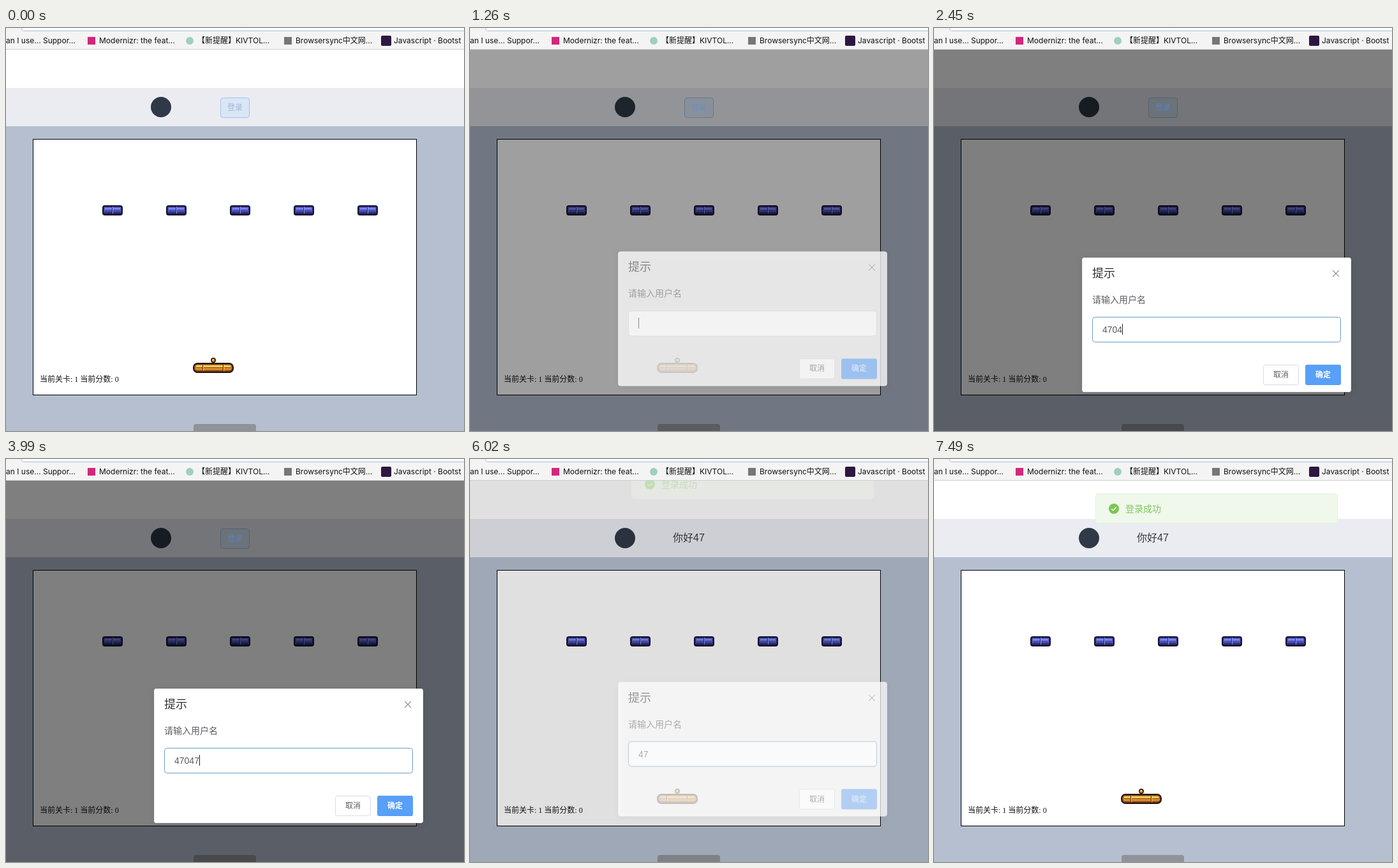
An HTML page with a canvas for the animation above (7560 ms loop, 718 by 632 pixels).

```html
<!DOCTYPE html>
<html lang="zh">
<head>
<meta charset="utf-8">
<title>Brick game login</title>
<style>
html, body { margin: 0; width: 100%; height: 100%; overflow: hidden; background: #fff; }
canvas { display: block; }
</style>
</head>
<body>
<canvas id="stage" width="718" height="632"></canvas>
<script>
const ctx = document.getElementById('stage').getContext('2d');
const W = 718, H = 632, LOOP = 7560;
const PAGE_TOP = 34, OPEN = 1170, CLOSE = 5930, GREET = 5958;
const UI = '"Liberation Sans", "Noto Sans CJK SC", "Noto Sans CJK", sans-serif';
const CHROME = 'Inter, "Noto Sans CJK SC", "Noto Sans CJK", sans-serif';
const SERIF = '"Liberation Serif", "Noto Sans CJK SC", "Noto Sans CJK", serif';

const USER = '47047047';
const TYPED = [2100, 2240, 2310, 2450, 2660, 2870, 3150, 3500];
const ERASED = [3710, 3850, 3990, 4060, 4200, 4410];

const clamp = v => Math.min(1, Math.max(0, v));

// CSS "ease": cubic-bezier(.25, .1, .25, 1)
function ease(x) {
  if (x <= 0 || x >= 1) return clamp(x);
  const bez = (a, b, s) => 3 * a * s * (1 - s) ** 2 + 3 * b * s * s * (1 - s) + s ** 3;
  let lo = 0, hi = 1;
  for (let i = 0; i < 20; i++) {
    const mid = (lo + hi) / 2;
    if (bez(0.25, 0.25, mid) < x) lo = mid; else hi = mid;
  }
  return bez(0.1, 1, lo);
}
const tween = (t, start, length) => ease((t - start) / length);

function mix(a, b, k) {
  return `rgb(${a.map((v, i) => Math.round(v + (b[i] - v) * k))})`;
}

function rect(x, y, w, h, color) {
  ctx.fillStyle = color;
  ctx.fillRect(x, y, w, h);
}

function box(x, y, w, h, r, fill, stroke) {
  ctx.beginPath();
  if (stroke) ctx.roundRect(x + 0.5, y + 0.5, w - 1, h - 1, r);
  else ctx.roundRect(x, y, w, h, r);
  ctx.fillStyle = fill;
  ctx.fill();
  if (stroke) {
    ctx.strokeStyle = stroke;
    ctx.lineWidth = 1;
    ctx.stroke();
  }
}

function disc(x, y, r, color) {
  ctx.beginPath();
  ctx.arc(x, y, r, 0, Math.PI * 2);
  ctx.fillStyle = color;
  ctx.fill();
}

function line(points, color, width) {
  ctx.beginPath();
  points.forEach(([x, y], i) => i ? ctx.lineTo(x, y) : ctx.moveTo(x, y));
  ctx.strokeStyle = color;
  ctx.lineWidth = width;
  ctx.stroke();
}

function text(str, x, y, size, color, family = UI, weight = 400) {
  ctx.font = `${weight} ${size}px ${family}`;
  ctx.fillStyle = color;
  ctx.fillText(str, x, y);
}

function drawChrome() {
  rect(0, 0, W, PAGE_TOP, '#f4f4f4');
  box(24, -10, 720, 15, 3, '#fff', '#a9bfdc');
  rect(0, 33, W, 1, '#cfcfcf');
  const label = (str, x) => text(str, x, 24, 12, '#111', CHROME);
  label('an I use... Suppor...', 0);
  rect(128, 14, 12, 12, '#d4267c');
  label('Modernizr: the feat...', 146);
  disc(288, 20, 6, '#9fcfc0');
  label('【新提醒】KIVTOL...', 300);
  rect(436, 14, 12, 12, '#777');
  label('Browsersync中文网...', 454);
  box(588, 12, 16, 16, 2, '#2b1740');
  label('Javascript · Bootst', 608);
}

function drawBrick(x, y) {
  box(x, y, 32, 16, 4, '#15112c');
  box(x + 2, y + 2, 28, 11, 2, '#3a3890');
  rect(x + 3, y + 3, 26, 7, '#4f58c0');
  rect(x + 4, y + 4, 24, 3, '#7886ee');
  rect(x + 5, y + 7, 22, 1, '#3c3fa0');
  rect(x + 4, y + 11, 24, 1, '#2b2468');
  rect(x + 15, y + 2, 1, 11, '#2c2a74');
  rect(x + 16, y + 2, 1, 11, '#8c98f4');
}

function drawPaddle(x, y) {
  box(x, y, 64, 16, 7, '#25170f');
  box(x + 2, y + 2, 60, 12, 5, '#7a3d16');
  box(x + 3, y + 3, 58, 9, 4, '#c47a26');
  rect(x + 5, y + 4, 54, 3, '#f2cc58');
  rect(x + 5, y + 7, 54, 1, '#8c4c1a');
  rect(x + 4, y + 8, 56, 3, '#d68a2c');
  for (const d of [15, 47]) {
    rect(x + d, y + 2, 1, 12, '#4a2814');
    rect(x + d + 1, y + 3, 1, 10, '#f4d77c');
  }
}

function drawGame() {
  rect(43, 175, 600, 400, '#fff');
  ctx.strokeStyle = '#000';
  ctx.lineWidth = 1;
  ctx.strokeRect(42.5, 174.5, 601, 401);
  for (let i = 0; i < 5; i++) drawBrick(151 + i * 100, 278);
  drawPaddle(293, 525);
  disc(325, 521, 4, '#25170f');
  disc(325, 521, 2.6, '#b87326');
  disc(324.7, 520.6, 1.4, '#f6d97a');
  text('当前关卡: 1 当前分数: 0', 53, 555, 12, '#111', SERIF);
}

function drawPage(t, shade) {
  rect(0, PAGE_TOP, W, 60, '#fff');
  rect(0, 94, W, 60, '#eaecf1');
  rect(0, 154, W, H - 154, '#b5bfd0');
  disc(243, 124, 16, '#2f3947');
  const loggedIn = t >= CLOSE;
  if (loggedIn) text('你好' + USER.slice(0, 2), 318, 129, 16, '#333a44');
  else box(336, 109, 46, 32, 4, '#d9e6f6', '#a5c2e6');
  drawGame();
  box(294, 621, 98, 20, 4, '#909399');
  rect(0, PAGE_TOP, W, H - PAGE_TOP, `rgba(0,0,0,${shade})`);
  if (!loggedIn) {
    text('登录', 347, 129, 12, mix([163, 182, 214], [92, 130, 186], shade * 2), UI, 500);
  }
}

function caretOn(t) {
  const edits = [1200, ...TYPED, ...ERASED].filter(e => e <= t);
  return edits.length > 0 && (t - edits[edits.length - 1]) % 1000 < 500;
}

function drawDialog(t) {
  const shown = t < CLOSE ? tween(t, OPEN, 300) : 1 - tween(t, CLOSE, 300);
  if (shown <= 0) return;
  ctx.save();
  ctx.globalAlpha = shown;
  ctx.translate(0, -20 * (1 - shown));

  ctx.shadowColor = 'rgba(0,0,0,.1)';
  ctx.shadowBlur = 12;
  ctx.shadowOffsetY = 2;
  box(232, 360, 422, 211, 4, '#fff');
  ctx.shadowColor = 'transparent';
  box(232, 360, 422, 211, 4, '#fff', '#ebeef5');

  text('提示', 248, 391, 18, '#303133');
  line([[625, 380], [635, 390]], '#909399', 1.1);
  line([[635, 380], [625, 390]], '#909399', 1.1);
  text('请输入用户名', 248, 431, 14, '#5a5d63');

  const focus = tween(t, 1350, 200);
  box(248, 453, 390, 40, 4, '#fff', mix([208, 211, 217], [106, 156, 196], focus));
  const past = list => list.filter(e => e <= t).length;
  const value = USER.slice(0, past(TYPED) - past(ERASED));
  text(value, 264, 478, 14, '#5a5d63');
  if (caretOn(t)) {
    rect(264 + Math.round(ctx.measureText(value).width), 464, 1, 17, '#222');
  }

  box(516, 528, 56, 32, 3, '#fff', '#d8dbe2');
  text('取消', 532, 548, 12, '#5a5d63', UI, 500);
  const hover = tween(t, 5600, 100);
  box(582, 528, 56, 32, 3, mix([88, 159, 248], [106, 166, 240], hover));
  text('确定', 598, 548, 12, '#fff', UI, 700);
  ctx.restore();
}

function drawMessage(t) {
  if (t < GREET) return;
  ctx.save();
  ctx.beginPath();
  ctx.rect(0, PAGE_TOP, W, H);
  ctx.clip();
  ctx.globalAlpha = tween(t, GREET, 300);
  ctx.translate(0, -48 * (1 - tween(t, GREET, 400)));
  box(253, 54, 380, 47, 4, '#eff8ea', '#e1f3d8');
  disc(282, 78, 8, '#7ac654');
  line([[278.3, 78.2], [281, 80.8], [285.8, 75.6]], '#fff', 1.5);
  text('登录成功', 300, 83, 14, '#80c664', UI, 500);
  ctx.restore();
}

function draw(t) {
  const shade = 0.5 * (t < CLOSE ? tween(t, OPEN, 200) : 1 - tween(t, CLOSE, 200));
  drawPage(t, shade);
  drawDialog(t);
  drawMessage(t);
  drawChrome();
}

const start = performance.now();
function tick() {
  draw((performance.now() - start) % LOOP);
  requestAnimationFrame(tick);
}
tick();
</script>
</body>
</html>
```
